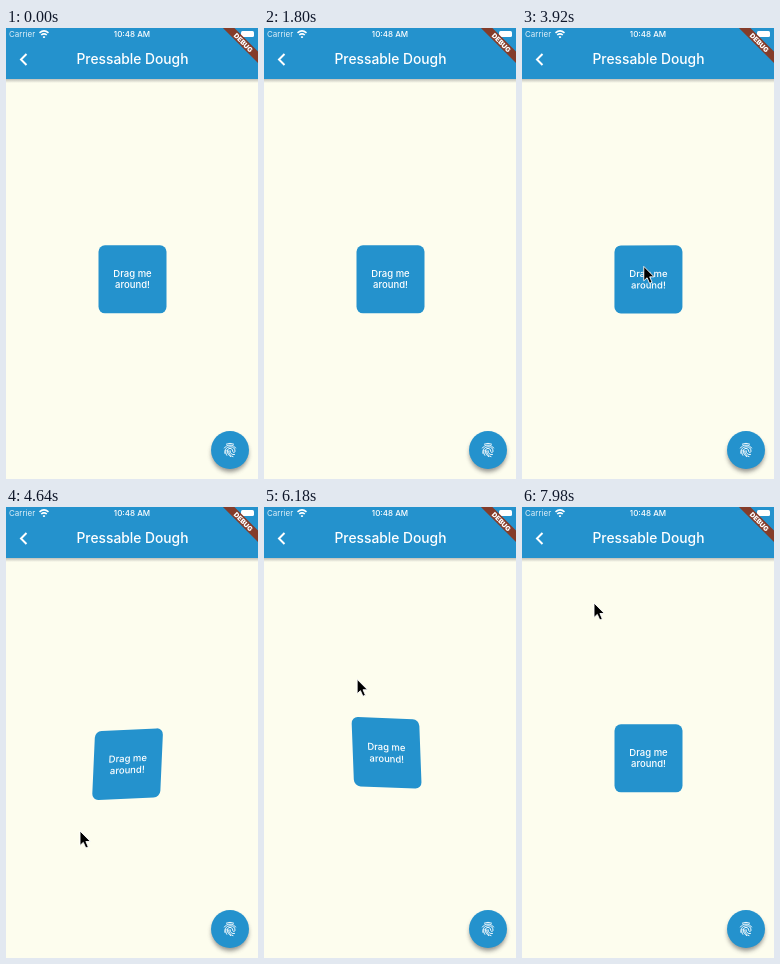
Animation of 252x451 px, one loop 8 s. Source, as an HTML page:

```html
<!DOCTYPE html>
<html lang="en">
<head>
<meta charset="utf-8">
<title>Pressable Dough</title>
<style>
  html, body { margin: 0; width: 100%; height: 100%; overflow: hidden; background: #fdfdee; }
  svg { display: block; width: 100%; height: 100%; }
  text { font-family: Inter, "Open Sans", sans-serif; font-weight: 500; fill: #fff; text-anchor: middle; }
  .blue { fill: #2492cd; }
  .line { fill: none; stroke: #fff; }
</style>
</head>
<body>
<svg viewBox="0 0 252 451">
  <defs>
    <linearGradient id="shade" x2="0" y2="1">
      <stop stop-color="#777" stop-opacity=".45"/>
      <stop offset="1" stop-color="#777" stop-opacity="0"/>
    </linearGradient>
    <filter id="soft" x="-30%" y="-30%" width="160%" height="160%"><feGaussianBlur stdDeviation="2.2"/></filter>
  </defs>
  <rect width="252" height="451" fill="#fdfdee"/>

  <!-- app bar -->
  <rect y="51" width="252" height="4" fill="url(#shade)"/>
  <rect class="blue" width="252" height="51"/>
  <text x="3" y="9" font-size="8" opacity=".85" style="text-anchor:start;font-weight:400">Carrier</text>
  <text x="126" y="9" font-size="8">10:48 AM</text>
  <g class="line" stroke-width="1.6">
    <path d="M33.5 4.8Q38 .9 42.5 4.8M35.2 7Q38 4.7 40.8 7"/>
    <path d="M37.6 9.1h.8" stroke-linecap="round"/>
  </g>
  <rect x="235" y="3" width="13" height="6" rx="1.5" fill="#fff"/>
  <path class="line" d="M20.5 26L15 31.5L20.5 37" stroke-width="2"/>
  <text x="126.5" y="36.4" font-size="13.8">Pressable Dough</text>

  <!-- dough -->
  <g id="dough">
    <rect class="blue" x="-34" y="-34" width="68" height="68" rx="6.5"/>
    <text y="-2.4" font-size="9.5">Drag me</text>
    <text y="9.1" font-size="9.5">around!</text>
  </g>

  <!-- floating button -->
  <circle cx="224" cy="425.5" r="18.5" fill="#555" opacity=".6" filter="url(#soft)"/>
  <circle class="blue" cx="224" cy="422" r="19"/>
  <g class="line" stroke-width=".95" stroke-linecap="round" transform="translate(224 422)">
    <path d="M-3.6-5.9Q0-7.6 3.6-5.9"/>
    <path d="M-5.6-2C-3.3-5.9 3.3-5.9 5.6-2"/>
    <path d="M-5.1 3.4C-6.8-4.6 5-5.4 5 1C5 3 2.7 3 2.7 1C2.7-2.4-2.7-2.4-2.7 1C-2.7 3.5-1.2 5.4 .6 6.6"/>
    <path d="M-3.2 5.3C-4.3 3.6-4.6 2-4 .2M0 .6C0 3.6 2 5 4.5 4.5M3 6.6C.6 6.1-1.3 4.3-1.3 1"/>
  </g>

  <!-- banner -->
  <g transform="translate(252 0) rotate(45)">
    <rect x="-42" y="16.7" width="84" height="8.1" fill="#843c2a"/>
    <text y="23.2" font-size="6.8" style="font-weight:900">DEBUG</text>
  </g>

  <path id="cursor" d="M0 0V14.5L3.3 11.4L5.8 17L8.3 15.9L5.9 10.5H10.4Z" stroke="#fff" stroke-width=".9"/>
</svg>
<script>
const LOOP = 8000, PRESS = 3900, RELEASE = 6430, SPRING = 500;
const GRIP = [122, 238];
const dough = document.getElementById('dough');
const cursor = document.getElementById('cursor');

// time, x, y of the pointer
const path = [
  [2480, -12, 20], [2780, 88, 191], [3260, 113, 226], [3480, 120, 236],
  [3760, ...GRIP], [PRESS, ...GRIP], [4450, 70, 325], [4640, 74, 324],
  [4740, 76, 321], [5420, 229, 43], [5580, 231, 43], [5950, 16, 52],
  [6050, 16, 52], [6370, 227, 381], [RELEASE, 227, 382], [6800, 125, 262],
  [6980, 127, 265], [7260, 127, 265], [7980, 72, 96], [LOOP, 72, 96]
];

function pointer(t) {
  const i = path.findIndex(k => k[0] > t);
  if (i < 1) return path[0].slice(1);
  const [t0, x0, y0] = path[i - 1], [t1, x1, y1] = path[i];
  const p = (t - t0) / (t1 - t0), e = p * p * (3 - 2 * p);
  return [x0 + (x1 - x0) * e, y0 + (y1 - y0) * e];
}

// Each axis gives way less and less the further it is dragged
const yieldTo = d => 8 * d / (Math.abs(d) + 30);

// 1 while held, then a damped swing down to 0
function hold(t) {
  if (t < PRESS || t > RELEASE + SPRING) return 0;
  const p = Math.max(0, (t - RELEASE) / SPRING);
  return 2 ** (-10 * p) * Math.cos(p * Math.PI * 5);
}

function draw(t) {
  const [x, y] = pointer(t);
  cursor.setAttribute('transform', `translate(${x} ${y})`);
  cursor.style.display = t < path[0][0] ? 'none' : '';

  const [vx, vy] = pointer(Math.min(t, RELEASE)).map((v, i) => yieldTo(v - GRIP[i]));
  const n = Math.hypot(vx, vy) || 1, ux = vx / n, uy = vy / n;
  const h = hold(t), s = n * h * .012, base = 1 - s * .4;
  // stretch along the pull, squeeze across it
  const m = [base + s * ux * ux, s * ux * uy, s * ux * uy, base + s * uy * uy,
             126.5 + vx * h, 251.3 + vy * h];
  dough.setAttribute('transform', `matrix(${m})`);
}

const start = performance.now();
function tick() {
  draw((performance.now() - start) % LOOP);
  requestAnimationFrame(tick);
}
tick();
</script>
</body>
</html>
```
